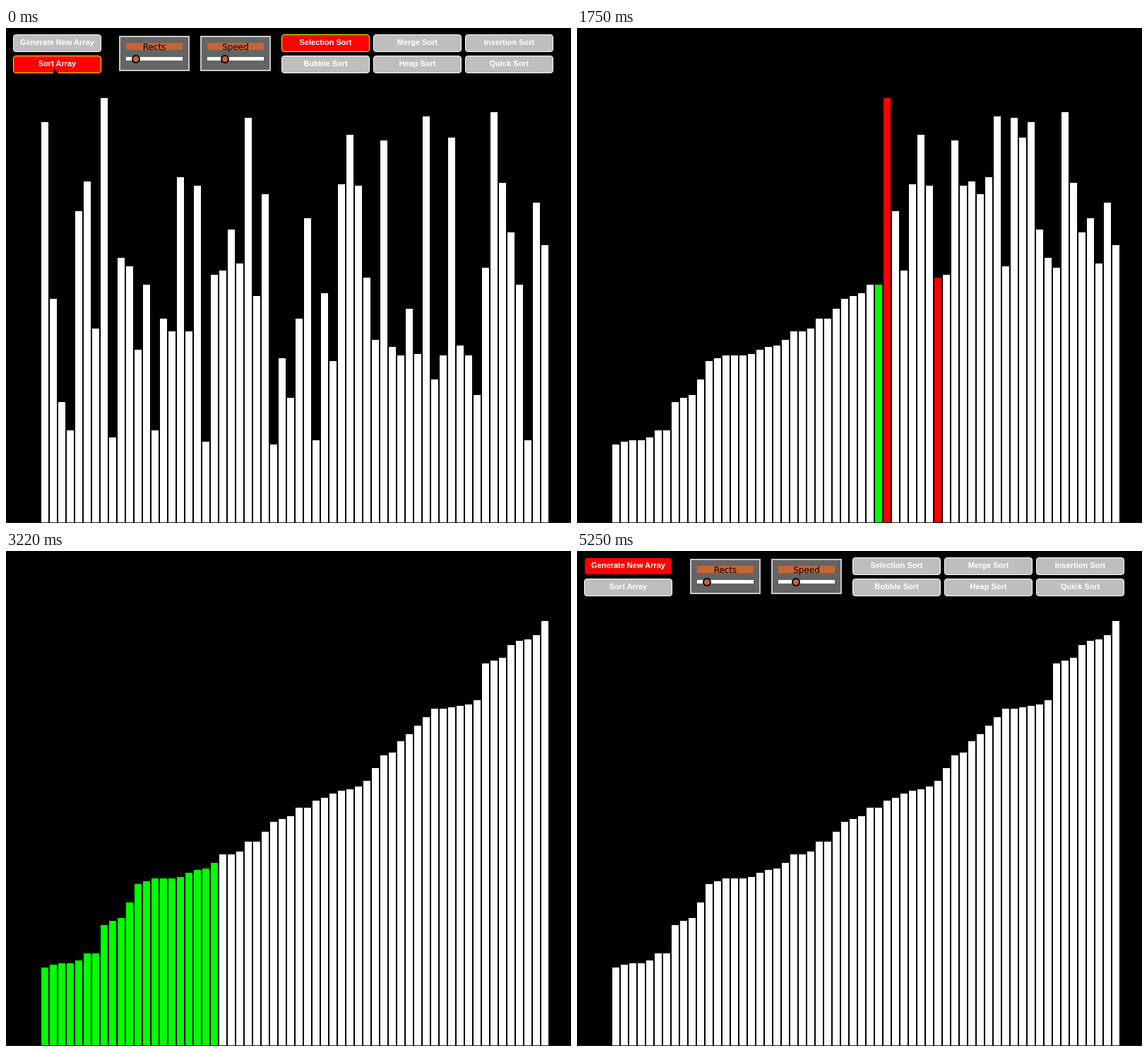
Write an HTML page that moves like this. It is 800 by 700 pixels and loops after 5.67 s.

```html
<!DOCTYPE html>
<html lang="en">
<head>
<meta charset="utf-8">
<title>Sorting visualizer</title>
<style>
  html, body { margin: 0; width: 100%; height: 100%; overflow: hidden; background: #000; }
  svg { display: block; width: 800px; height: 700px; }
  .btn rect { fill: #bebebe; stroke: #fff; }
  .btn text { font: bold 11px "Liberation Sans", Arial, sans-serif; fill: #fff; text-anchor: middle; }
  .btn.on rect { fill: #f00; stroke: #ff0; }
  .btn.hover rect { fill: #f00; stroke: #000; }
  .slider text { font: 12px "DejaVu Sans", Verdana, sans-serif; text-anchor: middle; }
  #bars { shape-rendering: crispEdges; }
</style>
</head>
<body>
<svg viewBox="0 0 800 700">
  <rect width="800" height="700"/>
  <rect y="699" width="800" height="1" fill="#241e19"/>
  <g id="bars"></g>
  <g id="panel">
    <g id="controls"></g>
    <path id="pointer" d="M67 57V66L69 64H74Z" fill="#100000"/>
  </g>
</svg>
<script>
const LOOP = 5670, TICK = 70, SORT_AT = 420, SWEEP_AT = 2940, DONE_AT = 3850;
const FLOOR = 699;
const WHITE = '#fff', GREEN = '#0f0', RED = '#f00';
const tops = [
  133, 383, 529, 569, 259, 217, 425, 99, 579, 325, 337, 455, 363, 569, 411,
  429, 211, 429, 223, 585, 349, 343, 285, 333, 127, 379, 235, 589, 467, 523,
  411, 269, 583, 375, 471, 221, 151, 223, 353, 441, 159, 451, 463, 397, 461,
  125, 497, 463, 155, 449, 463, 519, 339, 119, 219, 289, 363, 583, 247, 307
];
const N = tops.length;
const $ = id => document.getElementById(id);

function add(parent, tag, attrs, text) {
  const el = document.createElementNS('http://www.w3.org/2000/svg', tag);
  for (const key in attrs) el.setAttribute(key, attrs[key]);
  if (text) el.textContent = text;
  return parent.appendChild(el);
}

function button(label, x, y) {
  const g = add($('controls'), 'g', { class: 'btn' });
  add(g, 'rect', { x: x + .5, y: y + .5, width: 124, height: 24, rx: 3.5 });
  add(g, 'text', { x: x + 62.5, y: y + 15 }, label);
  return g;
}

function slider(label, x, knob) {
  const g = add($('controls'), 'g', { class: 'slider', transform: `translate(${x} 11)` });
  add(g, 'rect', { x: 1, y: 1, width: 98, height: 48, fill: '#646464', stroke: '#c8c8c8', 'stroke-width': 2 });
  add(g, 'rect', { x: 10, y: 10, width: 80, height: 10, fill: '#c86432' });
  add(g, 'text', { x: 50, y: 20 }, label);
  add(g, 'rect', { x: 10, y: 30, width: 80, height: 5, fill: '#fff' });
  add(g, 'circle', { cx: knob, cy: 33, r: 6 });
  add(g, 'circle', { cx: knob, cy: 33, r: 4, fill: '#c86432' });
}

const generate = button('Generate New Array', 10, 9);
const sort = button('Sort Array', 10, 39);
slider('Rects', 160, 24);
slider('Speed', 275, 35);
const selection = button('Selection Sort', 390, 9);
button('Merge Sort', 520, 9);
button('Insertion Sort', 650, 9);
button('Bubble Sort', 390, 39);
button('Heap Sort', 520, 39);
button('Quick Sort', 650, 39);

const bars = tops.map((_, i) => add($('bars'), 'rect', { x: 50 + 12 * i, width: 10 }));

// Every selection step, recorded just before its swap.
const steps = [];
const sorted = tops.slice();
for (let i = 0; i < N; i++) {
  let min = i;
  for (let j = i + 1; j < N; j++) if (sorted[j] > sorted[min]) min = j;
  steps.push({ list: sorted.slice(), min });
  [sorted[i], sorted[min]] = [sorted[min], sorted[i]];
}

function paint(list, color) {
  bars.forEach((bar, i) => {
    bar.setAttribute('y', list[i]);
    bar.setAttribute('height', FLOOR - list[i]);
    bar.setAttribute('fill', color(i));
  });
}

function draw(t) {
  const before = t < SORT_AT, after = t >= DONE_AT;
  $('panel').style.display = before || after ? '' : 'none';
  $('pointer').style.display = before ? '' : 'none';
  sort.classList.toggle('on', before);
  selection.classList.toggle('on', before);
  generate.classList.toggle('hover', after);

  if (before) paint(tops, () => WHITE);
  else if (after) paint(sorted, () => WHITE);
  else if (t < SWEEP_AT) {
    const tick = Math.floor((t - SORT_AT) / TICK);
    const at = Math.min(N - 1, Math.floor(1.7 * tick + .25));
    const { list, min } = steps[at];
    paint(list, i => i === at || i === min ? RED : i === at - 1 ? GREEN : WHITE);
  } else {
    const tick = Math.floor((t - SWEEP_AT) / TICK);
    const count = Math.floor(4.625 * tick + 2.5);
    paint(sorted, i => i < count ? GREEN : WHITE);
  }
}

const start = performance.now();
function loop() {
  draw((performance.now() - start) % LOOP);
  requestAnimationFrame(loop);
}
loop();
</script>
</body>
</html>
```
